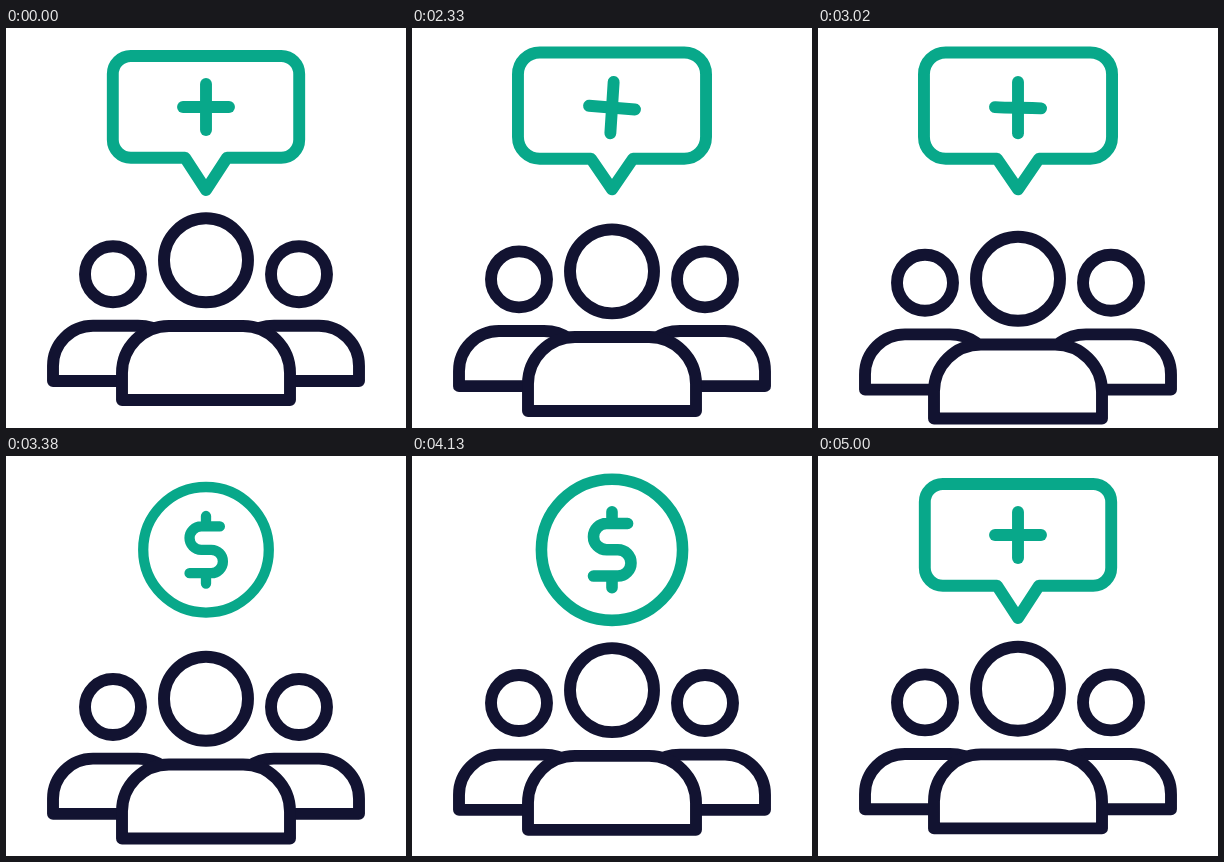
An HTML page with a canvas that plays this animation: 400 by 400 pixels, repeating every 5030 ms.

```html
<!DOCTYPE html>
<html lang="en">
<head>
<meta charset="utf-8">
<title>Group benefits</title>
<style>
  html, body { margin: 0; width: 100%; height: 100%; overflow: hidden; background: #fff; }
  canvas { display: block; width: 100vmin; height: 100vmin; }
</style>
</head>
<body>
<canvas width="400" height="400"></canvas>
<script>
const ctx = document.querySelector('canvas').getContext('2d');
const NAVY = '#121331', GREEN = '#08a88a';
const LOOP = 5030, START = 2030, STEP = 30, WEIGHT = 11.9;
const COIN_IN = 3230, COIN_OUT = 4340;

const span = (t, a, b) => Math.min(1, Math.max(0, (t - a) / (b - a)));
const ease = (t, a, b) => { const u = span(t, a, b); return u * u * (3 - 2 * u); };
const pulse = (t, a, b) => Math.sin(Math.PI * span(t, a, b));

// Visible width of a spinning shape: 0 when edge-on at `mid`, 1 outside the turn.
const spin = (t, mid, before, after) =>
  Math.sin(Math.PI / 2 * Math.min(1, Math.abs(t - mid) / (t < mid ? before : after)));
const flip = t => spin(t, COIN_IN, 200, 150) * spin(t, COIN_OUT, 180, 450);

// The group sinks quickly, then drifts back up.
const sink = t => 20.5 * ease(t, START, 2600) / (1 + (Math.max(0, t - 2600) / 790) ** 3.5);

// The transform shapes the path only, so line weight stays constant.
function line(color, path, { x = 0, y = 0, sx = 1, sy = 1, weight = WEIGHT, fill = false } = {}) {
  const shape = new Path2D();
  shape.addPath(new Path2D(path), new DOMMatrix([sx, 0, 0, sy, x, y]));
  if (fill) ctx.fill(shape);
  ctx.strokeStyle = color;
  ctx.lineWidth = weight;
  ctx.stroke(shape);
}

const circle = r => `M${r} 0A${r} ${r} 0 1 1 ${-r} 0A${r} ${r} 0 1 1 ${r} 0Z`;

function people(y) {
  const sideY = y * 0.465;
  for (const side of [-1, 1]) {
    line(NAVY, circle(28), { x: 200 + side * 93, y: 246.2 + sideY });
    line(NAVY, 'M84 353H153V338A40 40 0 0 0 113 297.8H68C58 297.8 49 301 42 306',
      { x: 200, y: sideY, sx: side });
  }
  line(NAVY, circle(42), { x: 200, y: 232.3 + y });
  line(NAVY, 'M116 372V345A47 47 0 0 1 163 298H237A47 47 0 0 1 284 345V372Z', { y, fill: true });
}

function bubble(t) {
  const squash = pulse(t, 2000, 2300), stretch = pulse(t, 2200, 3150);
  const w = 93.2 - 6 * squash + 2 * stretch;
  const top = 28 + 10 * squash - 8.5 * stretch;
  const bottom = 129.7 + 3 * squash + 2.5 * stretch;
  const r = 18 + 9 * stretch;
  const corner = `A${r} ${r} 0 0 1 `;
  const sx = flip(t);
  line(GREEN, `M-21 ${bottom}H${r - w}${corner}${-w} ${bottom - r}V${top + r}${corner}${r - w} ${top}
    H${w - r}${corner}${w} ${top + r}V${bottom - r}${corner}${w - r} ${bottom}
    H21L0 ${162 - 1.5 * stretch}Z`, { x: 200, sx });

  const turn = Math.PI * ease(t, 1990, 2650), bend = pulse(t, 2450, 3050);
  const c = Math.cos(turn), s = Math.sin(turn);
  const at = (x, y) => `${x * c - y * s} ${x * s + y * c} `;
  const place = { x: 200, y: 79 + 4.5 * squash + 1.5 * stretch, sx, sy: 1 + 0.28 * stretch };
  line(GREEN, 'M' + at(0, -23) + 'L' + at(0, 23), place);
  line(GREEN, 'M' + at(-23, -4 * bend) + 'C' + at(-10, 3 * bend) + at(8, -4 * bend)
    + at(23, 3 * bend), place);
}

function coin(t) {
  const size = 0.8 + 0.2 * ease(t, COIN_IN, 3620) - 0.04 * ease(t, 3800, COIN_OUT);
  const place = { x: 200, y: 93.8, sx: size * flip(t), sy: size, weight: WEIGHT * size };
  line(GREEN, circle(72.5), place);
  line(GREEN, `M16 -27H-5.5A13.5 13.5 0 0 0 -5.5 0H6A13.5 13.5 0 0 1 6 27H-19
    M0 -39V-27M0 27V39`, place);
}

function draw(now) {
  let t = now % LOOP;
  t = t < START ? 0 : t - (t - START) % STEP;
  ctx.clearRect(0, 0, 400, 400);
  ctx.fillStyle = '#fff';
  ctx.lineCap = ctx.lineJoin = 'round';
  people(sink(t));
  if (t >= COIN_IN && t < COIN_OUT) coin(t);
  else bubble(t);
  requestAnimationFrame(draw);
}
requestAnimationFrame(draw);
</script>
</body>
</html>
```
